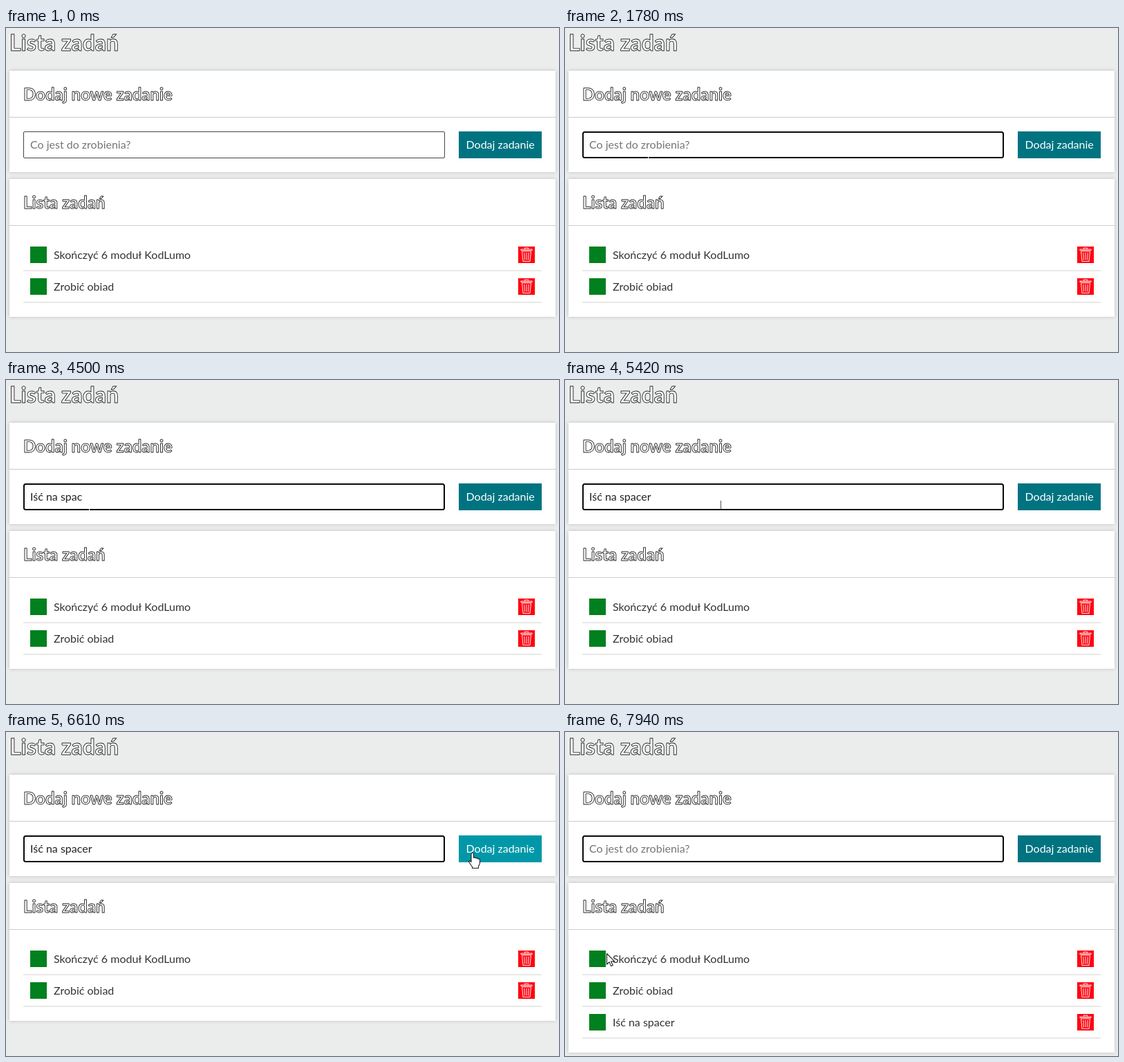
Recreate the animation shown at these times as an HTML page with a canvas. Size 800 px wide and 470 px high, loop 8000 ms.

```html
<!DOCTYPE html>
<html lang="pl">
<head>
<meta charset="utf-8">
<title>Lista zadań</title>
<style>
html, body { margin: 0; width: 100%; height: 100%; overflow: hidden; background: #ebecec; }
canvas { display: block; }
</style>
</head>
<body>
<canvas id="stage" width="800" height="470"></canvas>
<script>
const ctx = document.getElementById('stage').getContext('2d');
const LOOP = 8000, STEP = 66.6;
const FOCUS = 1380, PRESS = 6610, ADDED = 6750;
const TASKS = ['Skończyć 6 moduł KodLumo', 'Zrobić obiad', 'Iść na spacer'];

// [time, number of typed characters]
const TYPING = [[1910, 1], [2310, 2], [2770, 3], [3640, 5], [3770, 6], [4100, 8],
  [4240, 9], [4300, 10], [4500, 11], [4630, 12], [4760, 13]];

// Pointer paths: start time, number of steps, waypoints [step, x, y]
const PATHS = [
  { start: 320, steps: 5, points: [[0, 260, 178], [5, 127, 170]] },
  { start: 1380, steps: 3, points: [[0, 127, 170], [3, 120, 182]] },
  { start: 5290, steps: 11, points: [[0, 120, 182], [9, 673, 175], [11, 675, 175]] },
  { start: 7140, steps: 12, points: [[0, 660, 184], [2, 597, 208], [12, 60, 321]] }
];

function rect(x, y, w, h, color) {
  ctx.fillStyle = color;
  ctx.fillRect(x, y, w, h);
}

function text(label, x, y, color) {
  ctx.font = '16px Lato, sans-serif';
  ctx.fillStyle = color;
  ctx.fillText(label, x, y);
}

function heading(label, x, y, size) {
  ctx.font = `bold ${size}px Lato, sans-serif`;
  ctx.fillStyle = '#fff';
  ctx.fillText(label, x, y);
  ctx.strokeStyle = '#222';
  ctx.lineWidth = 0.9;
  ctx.lineJoin = 'round';
  ctx.strokeText(label, x, y);
}

function card(y, height, title) {
  ctx.save();
  ctx.shadowColor = 'rgba(0, 0, 0, 0.2)';
  ctx.shadowBlur = 5;
  rect(5, y, 790, height, '#fff');
  ctx.restore();
  rect(5, y + 67, 790, 1, '#ccc');
  heading(title, 25, y + 43, 24);
}

function trash(x, y) {
  rect(x, y, 24, 24, '#ff0010');
  ctx.strokeStyle = '#ffd8d8';
  ctx.lineWidth = 1.1;
  ctx.stroke(new Path2D(`M${x + 4} ${y + 5.5}v-1.5h16v1.5z
    M${x + 9.5} ${y + 3.5}v-1.5h5v1.5
    M${x + 5.5} ${y + 7}l1.5 14.5h10l1.5 -14.5z
    M${x + 8.8} ${y + 9}l.6 10.5 M${x + 12} ${y + 9}v10.5 M${x + 15.2} ${y + 9}l-.6 10.5`));
}

function task(label, index) {
  const y = 317 + index * 46;
  rect(35, y, 24, 24, '#00801e');
  text(label, 69, y + 18, '#333');
  trash(741, y);
  rect(25, y + 34, 750, 2, '#e9e9e9');
}

function input(t) {
  const focused = t >= FOCUS, width = focused ? 2 : 1;
  ctx.beginPath();
  ctx.roundRect(25 + width / 2, 150 + width / 2, 610 - width, 39 - width, focused ? 2.5 : 1.5);
  ctx.strokeStyle = focused ? '#080808' : '#444';
  ctx.lineWidth = width;
  ctx.stroke();
  const typed = TYPING.reduce((count, [time, n]) => t >= time ? n : count, 0);
  if (typed && t < ADDED) text(TASKS[2].slice(0, typed), 35, 175, '#222');
  else text('Co jest do zrobienia?', 35, 175, '#757575');
}

function pointerAt(t) {
  const path = PATHS.filter(p => t >= p.start).pop();
  if (!path) return null;
  const step = Math.min(path.steps, Math.floor((t - path.start) / STEP + 0.05));
  const points = path.points;
  const i = Math.max(1, points.findIndex(p => p[0] >= step));
  const [s0, x0, y0] = points[i - 1], [s1, x1, y1] = points[i];
  const k = (step - s0) / (s1 - s0);
  const ease = s1 - s0 > 4 ? k * (2 + k * (3 - 2 * k)) / 3 : k;
  return { x: x0 + (x1 - x0) * ease, y: y0 + (y1 - y0) * ease };
}

function outlined(x, y, shape) {
  ctx.save();
  ctx.translate(Math.round(x), Math.round(y));
  const path = new Path2D(shape);
  ctx.fillStyle = '#fff';
  ctx.fill(path);
  ctx.strokeStyle = '#1c1c24';
  ctx.lineWidth = 1.1;
  ctx.lineJoin = 'round';
  ctx.stroke(path);
  ctx.restore();
}

const ARROW = 'M.5 .5V16l3.6-3.4 2.6 6 2.5-1.1-2.6-5.8h5z';
const HAND = `M-2 1.5Q0-1 1.5 1.5V7.5Q4 6 5 8.3 7 7 8 9.2 10.5 8.5 10.5 11
  V15Q10 18 8.5 19.5V22.5H-.5V20.5Q-3 17.5-5.5 13-5.5 10.5-2 13.5z`;

function pointer(p, t) {
  const inInput = p.x >= 25 && p.x < 635 && p.y >= 150 && p.y < 189;
  if (overButton(p)) outlined(p.x, p.y, HAND);
  else if (!inInput) outlined(p.x, p.y, ARROW);
  else if (t >= 1580 && t < 5290) rect(120, 187, 1, 2, '#fff');
  else rect(Math.round(p.x), Math.round(p.y) - 6, 1, 12, '#555');
}

function overButton(p) {
  return p && p.x >= 655 && p.x < 775 && p.y >= 150 && p.y < 189;
}

function draw(t) {
  const p = pointerAt(t), added = t >= ADDED;
  rect(0, 0, 800, 470, '#ebecec');
  heading('Lista zadań', 5, 33, 32);
  card(62, 147, 'Dodaj nowe zadanie');
  input(t);
  const pressed = t >= PRESS && t < ADDED;
  rect(655, 150, 120, 39, pressed ? '#0098a8' : overButton(p) ? '#008899' : '#007380');
  text('Dodaj zadanie', 665.5, 175, '#fff');
  card(219, added ? 246 : 200, 'Lista zadań');
  TASKS.slice(0, added ? 3 : 2).forEach(task);
  if (p) pointer(p, t);
}

const began = performance.now();
function frame() {
  draw((performance.now() - began) % LOOP);
  requestAnimationFrame(frame);
}
frame();
</script>
</body>
</html>
```
